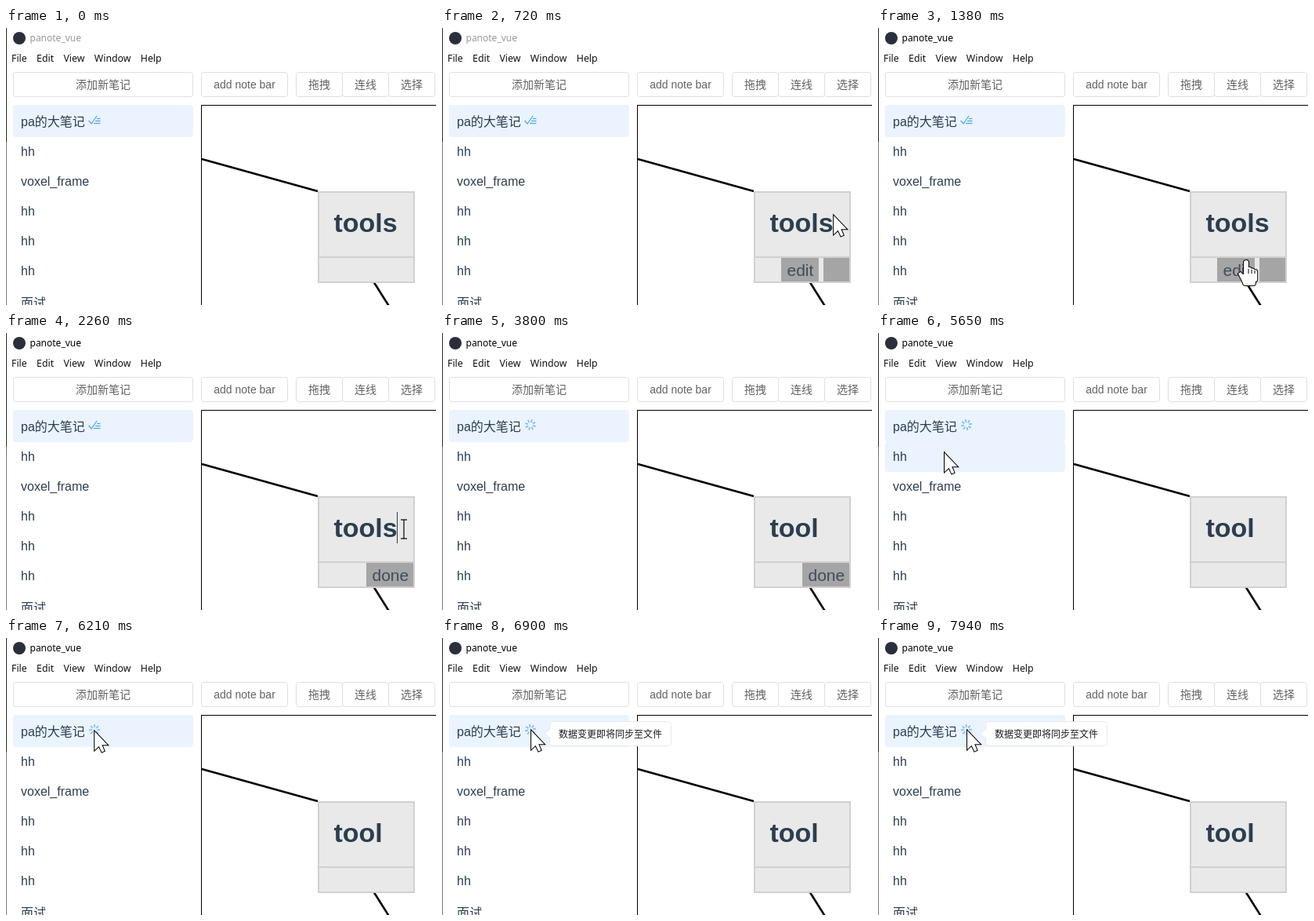
These frames come from a looping animation (549x353 px, 8000 ms). An HTML page with a canvas:

```html
<!DOCTYPE html>
<html lang="zh">
<head>
<meta charset="utf-8">
<title>panote_vue</title>
<style>
  html, body { margin: 0; width: 100%; height: 100%; overflow: hidden; background: #fff; }
  canvas { display: block; width: 549px; height: 353px; }
</style>
</head>
<body>
<canvas id="stage" width="549" height="353"></canvas>
<script>
const ctx = document.getElementById('stage').getContext('2d', { alpha: false });
const W = 549, H = 353, LOOP = 8000, TURN = Math.PI * 2;
const INK = '#2c3e50', EDGE = '#dcdfe6', ACTIVE = '#eaf3fe';
const UI = '"Noto Sans", "Open Sans", sans-serif';
const BODY = '"Liberation Sans", "Noto Sans CJK SC", "Noto Sans CJK", sans-serif';

// Moments of the story, in ms
const ENTER = 250, FOCUS = 1000, EDIT = 1600, PLACE = 2130;
const ERASE = 3460, RETURN = 3950, DONE = 5110, TIP = 6290;

const CARD = { x: 399, y: 209, w: 122, h: 115, bar: 292 };

// The pointer rests at each goal until the next move starts
const START = { x: 516, y: 340 };
const MOVES = [
  { at: ENTER, ms: 500, x: 500, y: 238 },
  { at: 940, ms: 360, x: 470, y: 296 },
  { at: 1780, ms: 300, x: 508, y: 250 },
  { at: RETURN, ms: 250, x: 500, y: 340 },
  { at: 4220, ms: 580, x: 477, y: 321 },
  { at: DONE, ms: 530, x: 85, y: 153 },
  { at: 5860, ms: 390, x: 114, y: 118 }
];

const clamp = u => Math.min(1, Math.max(0, u));
const ease = u => u * u * (3 - 2 * u);

function pointerAt(t) {
  if (t < ENTER || (t >= ERASE && t < RETURN)) return null;
  let { x, y } = START;
  for (const m of MOVES) {
    const u = ease(clamp((t - m.at) / m.ms));
    x += (m.x - x) * u;
    y += (m.y - y) * u;
  }
  return { x, y };
}

const inside = (p, x, y, w, h) => !!p && p.x >= x && p.x < x + w && p.y >= y && p.y < y + h;

function rect(x, y, w, h, color) {
  ctx.fillStyle = color;
  ctx.fillRect(x, y, w, h);
}

function rounded(x, y, w, h, r, fill, stroke) {
  ctx.beginPath();
  ctx.roundRect(x, y, w, h, r);
  ctx.fillStyle = fill;
  ctx.fill();
  if (!stroke) return;
  ctx.strokeStyle = stroke;
  ctx.lineWidth = 1;
  ctx.stroke();
}

function text(str, x, y, font, color, align = 'left') {
  ctx.font = font;
  ctx.fillStyle = color;
  ctx.textAlign = align;
  ctx.fillText(str, x, y);
  return ctx.measureText(str).width;
}

function line(x0, y0, x1, y1, color, width) {
  ctx.strokeStyle = color;
  ctx.lineWidth = width;
  ctx.beginPath();
  ctx.moveTo(x0, y0);
  ctx.lineTo(x1, y1);
  ctx.stroke();
}

function drawTitle(t) {
  ctx.fillStyle = '#2b2e3b';
  ctx.beginPath();
  ctx.arc(17, 13, 8, 0, TURN);
  ctx.fill();
  text('panote_vue', 30.5, 17, '12px ' + UI, t >= FOCUS ? '#000' : '#999');
  let x = 7;
  for (const s of ['File', 'Edit', 'View', 'Window', 'Help']) {
    x += text(s, x, 43, '12.3px ' + UI, '#111') + 12.4;
  }
}

function drawToolbar() {
  const button = (x, w, label) => {
    rounded(x, 56.5, w, 31, 3, '#fff', EDGE);
    text(label, x + w / 2, 77, '14px ' + BODY, '#606266', 'center');
  };
  button(9.5, 229, '添加新笔记');
  button(249.5, 110, 'add note bar');
  ['拖拽', '连线', '选择'].forEach((s, i) => button(370.5 + i * 59, 59, s));
}

function drawCheck() {
  ctx.strokeStyle = '#4ba6e6';
  ctx.lineWidth = 1.2;
  ctx.stroke(new Path2D('M105.5 118L109 122L116 112'));
  for (let i = 0; i < 3; i++) line(116 - i * 2, 115.5 + i * 3, 120.5, 115.5 + i * 3, '#4ba6e6', 1.2);
}

function drawSpinner(t) {
  ctx.save();
  ctx.translate(113, 117);
  ctx.rotate((t - ERASE) / 2000 * TURN);
  for (let i = 0; i < 8; i++) {
    line(0, -3.2, 0, -7, '#7dbbf6', 1.7);
    ctx.rotate(TURN / 8);
  }
  ctx.restore();
}

function drawList(t, p) {
  const names = ['pa的大笔记', 'hh', 'voxel_frame', 'hh', 'hh', 'hh', '面试'];
  rounded(9, 98, 230, 41, 4, ACTIVE);
  if (inside(p, 9, 139, 230, 38)) rounded(9, 139, 230, 38, 4, ACTIVE);
  names.forEach((s, i) => text(s, 19, 125 + i * 38 + (i === 6 ? 3 : 0), '16px ' + BODY, INK));
  if (t < ERASE) drawCheck();
  else drawSpinner(t);
}

// Buttons sit against the right end of the bar; an empty label keeps a minimum width
function drawButtons(labels) {
  let right = CARD.x + CARD.w;
  ctx.font = '21px ' + BODY;
  for (const s of labels) {
    const w = Math.round(Math.max(20, ctx.measureText(s).width) + 14);
    rect(right - w, CARD.bar + 1, w, 31, '#a5a5a5');
    text(s, right - w + 7.5, 316, '21px ' + BODY, '#3f4c5a');
    right -= w + 6;
  }
}

function drawCaret(t) {
  const [since, x] = t < PLACE ? [EDIT, 419] : t < ERASE ? [PLACE, 499] : [ERASE - 200, 480];
  if ((t - since) % 1060 < 530) rect(x, 228, 1, 40, INK);
}

function drawCard(t, p) {
  const { x, y, w, h, bar } = CARD;
  const editing = t >= EDIT && t < DONE;
  rect(x, y, w, h, '#e9e9e9');
  if (editing) drawButtons(['done']);
  else if (inside(p, x, y, w, h)) drawButtons(['', 'edit']);
  ctx.strokeStyle = '#d0d0d0';
  ctx.lineWidth = 2;
  ctx.strokeRect(x, y, w, h);
  line(x, bar, x + w, bar, '#d0d0d0', 2);
  text(t < ERASE ? 'tools' : 'tool', 418.5, 260, 'bold 34px ' + BODY, INK);
  if (editing) drawCaret(t);
}

function drawBoard(t, p) {
  rect(249, 98, 300, 1, '#000');
  rect(249, 98, 1, 255, '#000');
  line(250, 167, 398, 208, '#000', 2.6);
  line(468.5, 322, 489, 354.5, '#000', 2.6);
  drawCard(t, p);
}

function drawTip(t) {
  ctx.globalAlpha = clamp((t - TIP) / 300);
  rounded(137.5, 106.5, 155, 31, 4, '#fff', '#e6e9f0');
  ctx.fillStyle = '#fff';
  ctx.fill(new Path2D('M139 116L132 122L139 128Z'));
  text('数据变更即将同步至文件', 149, 127, '12px ' + BODY, '#1c1d20');
  ctx.globalAlpha = 1;
}

const ARROW = new Path2D('M0 0V24L5.5 18.8L9.2 26.5L12.5 25L9.2 17.2H16.5Z');

const HAND = new Path2D('M-10 17L-7 15L-1 21L2 31H-3Z');
HAND.roundRect(-3, 0, 6, 24, 3);
HAND.roundRect(-4, 17, 16, 15, 3);
for (let i = 0; i < 3; i++) HAND.roundRect(2 + i * 3.6, 9 + i * 1.5, 5, 15, 2.5);

function outlined(shape) {
  ctx.strokeStyle = '#000';
  ctx.lineWidth = 2;
  ctx.stroke(shape);
  ctx.fillStyle = '#fff';
  ctx.fill(shape);
}

function drawPointer(t, p) {
  if (!p) return;
  ctx.save();
  ctx.translate(p.x, p.y);
  const { x, y, w, h, bar } = CARD;
  if (t > EDIT && t < DONE && inside(p, x, y, w, bar - y)) {
    line(0, -12, 0, 12, '#000', 1.2);
    for (const end of [-12, 12]) line(-4, end, 4, end, '#000', 1.2);
  } else if (inside(p, 433, bar, x + w - 433, h + y - bar)) {
    outlined(HAND);
    for (let i = 0; i < 3; i++) line(3 + i * 4, 11 + i, 3 + i * 4, 17, '#000', 1);
  } else {
    outlined(ARROW);
  }
  ctx.restore();
}

function draw(t) {
  const p = pointerAt(t);
  rect(0, 0, W, H, '#fff');
  rect(0, 0, 1, H, '#777');
  rect(0, 0, 1, 145, '#2a2a2a');
  drawTitle(t);
  drawToolbar();
  drawList(t, p);
  drawBoard(t, p);
  drawTip(t);
  drawPointer(t, p);
}

const begin = performance.now();
function tick() {
  draw((performance.now() - begin) % LOOP);
  requestAnimationFrame(tick);
}
tick();
</script>
</body>
</html>
```
